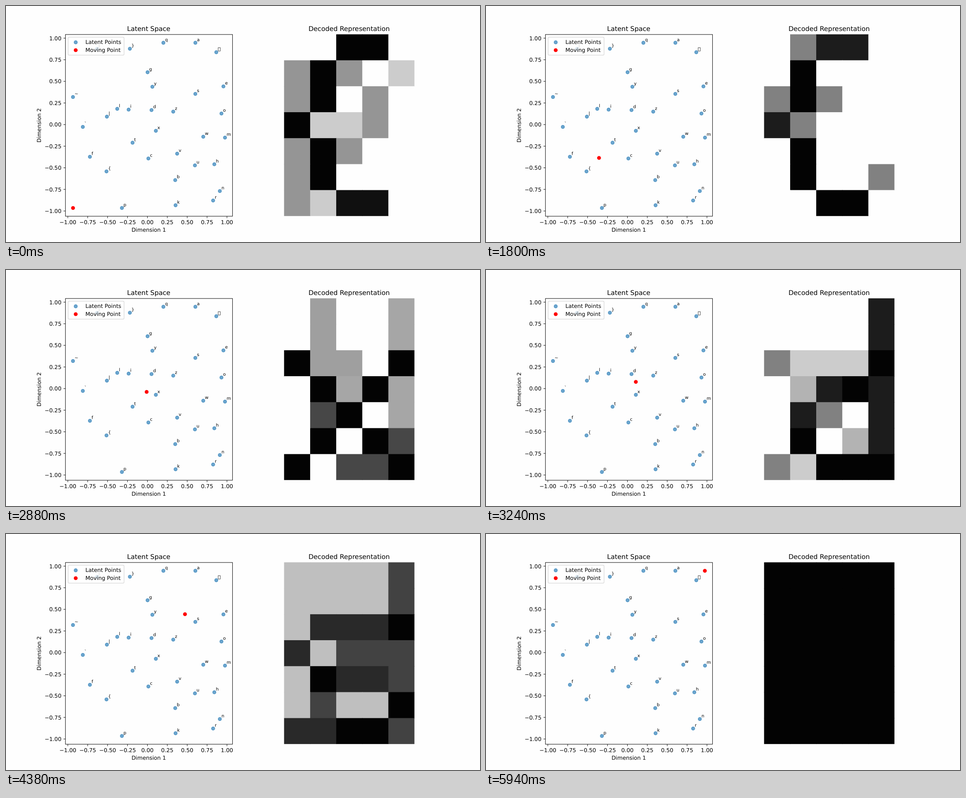
An HTML page that plays this animation: 1058x529 px, repeating every 6000 ms.

```html
<!DOCTYPE html>
<html lang="en">
<head>
<meta charset="utf-8">
<title>Latent Space</title>
<style>
  html, body { margin: 0; width: 100%; height: 100%; overflow: hidden; background: #fefefe; }
  svg { display: block; width: 1058px; height: 529px; }
  text { font-family: "DejaVu Sans", sans-serif; font-size: 12.25px; text-rendering: geometricPrecision; }
  .title { font-size: 14.7px; }
  .name { font-size: 9.8px; }
  .mid { text-anchor: middle; }
  .end { text-anchor: end; }
  .line { fill: none; stroke: #000; stroke-width: .98; }
  .dot { fill: #1f77b4; stroke: #1f77b4; stroke-width: 1.2; fill-opacity: .65; stroke-opacity: .65; }
  .red { fill: #f00; stroke: #f00; stroke-width: 1.2; }
  .box { fill: #fff; fill-opacity: .8; stroke: #ccc; stroke-opacity: .8; stroke-width: 1.2; }
</style>
</head>
<body>
<svg id="stage" viewBox="0 0 1058 529"></svg>
<script>
const stage = document.getElementById('stage');

function add(tag, attrs, content) {
  const el = document.createElementNS('http://www.w3.org/2000/svg', tag);
  for (const key in attrs) el.setAttribute(key, attrs[key]);
  if (content) el.textContent = content;
  stage.append(el);
  return el;
}
const text = (x, y, content, cls = '') => add('text', { x, y, class: cls }, content);
const dot = (cx, cy, cls = 'dot') => add('circle', { cx, cy, r: 3.68, class: cls });

// Scatter points
const points = {
  '~': [149.5, 204], '`': [171.5, 271], '|': [225.2, 248], l: [248.3, 230.5],
  i: [273.7, 232.3], '}': [276.5, 95.7], q: [351.3, 82.4], a: [422.7, 82.4],
  g: [316, 148.5], y: [326.7, 181], s: [422.6, 197], e: [485.3, 180.3],
  d: [324.8, 233.2], z: [373.3, 236.7], o: [480.9, 241], x: [334.5, 279.8],
  w: [440.3, 293], m: [488.8, 295], t: [282.5, 306.4], f: [187.3, 338],
  c: [317.8, 341.7], v: [382, 331], u: [421.7, 357.3], h: [465, 354.8],
  '{': [224.3, 370.7], b: [377.7, 390.2], n: [477.3, 414.7], k: [378.5, 446.6],
  r: [462.3, 436], p: [258.7, 452.8], j: [203, 96], '\x7f': [469.4, 103.6]
};
for (const name in points) dot(...points[name]);
const mover = dot(0, 0, 'red');
for (const name in points) {
  const [x, y] = points[name];
  if (name === '\x7f') {
    add('rect', { x: x + 4.3, y: y - 10.4, width: 4.5, height: 7.8, class: 'line', style: 'stroke-width:.7' });
  } else text(x + 3.6, y - 3.9, name, 'name');
}

// Axes
add('rect', { x: 132.7, y: 63.9, width: 372.9, height: 407.3, class: 'line' });
for (let i = -4; i <= 4; i++) {
  const label = (i < 0 ? '\u2212' : '') + Math.abs(i / 4).toFixed(2);
  const x = 315.6 + 44.4 * i, y = 265.8 - 48.43 * i;
  add('path', { d: `M${x} 471.2v4.3M132.7 ${y}h-4.3`, class: 'line' });
  text(x, 489.3, label, 'mid');
  text(123.7, y + 4.5, label, 'end');
}
text(318.6, 506.4, 'Dimension 1', 'mid');
add('text', { transform: 'translate(78 267.5) rotate(-90)', class: 'mid' }, 'Dimension 2');
text(318.6, 56.3, 'Latent Space', 'title mid');
text(765.9, 56.3, 'Decoded Representation', 'title mid');

// Legend
add('rect', { x: 138.7, y: 69.8, width: 124.8, height: 40.4, rx: 2.4, class: 'box' });
dot(155.6, 81.4);
dot(155.6, 99, 'red');
text(177.2, 85, 'Latent Points');
text(177.2, 102.9, 'Moving Point');

// Letters as pen strokes on a 5 by 7 grid; each corner is column then row
const COLS = 5, ROWS = 7;
const strokes = {
  '{': '30 20 11 12 03 14 15 26 36',
  p: '06 01 21 32 33 24 04',
  f: '16 11 20 30 41, 03 23',
  t: '10 15 26 36 45, 02 22',
  x: '02 46, 42 06',
  d: '40 46 26 15 14 23 43',
  z: '02 42 06 46',
  s: '42 12 03 14 34 45 36 06'
};

function trace(path) {
  const inked = new Set();
  for (const line of path.split(', ')) {
    const corners = line.split(' ').map(p => [...p].map(Number));
    corners.reduce(([x0, y0], [x1, y1]) => {
      const n = Math.max(Math.abs(x1 - x0), Math.abs(y1 - y0));
      for (let i = 0; i <= n; i++) {
        inked.add(`${x0 + (x1 - x0) * i / n},${y0 + (y1 - y0) * i / n}`);
      }
      return [x1, y1];
    });
  }
  return inked;
}
const glyphs = Object.entries(strokes).map(([name, path]) => ({ name, inked: trace(path) }));
glyphs.push({ name: 'full', inked: { has: () => true } });

// How strongly each letter shows as the point passes it
const mixes = [
  { step: 0, '{': .95, p: .42, f: .2 },
  { step: 17, '{': 1, p: .14, f: .08 },
  { step: 22, '{': 1 },
  { step: 30, '{': .9, t: .5 },
  { step: 39, t: 1 },
  { step: 48, x: 1, t: .38, d: .35 },
  { step: 54, x: .3, d: .9, z: .2 },
  { step: 60, z: .8, d: .66 },
  { step: 73, s: .6, d: .5, full: .25 },
  { step: 88, full: 1 }
];

const CELL = 58.19, LEFT = 620.69, TOP = 63.48;
const cells = [];
for (let r = 0; r < ROWS; r++) {
  for (let c = 0; c < COLS; c++) {
    // A slight overlap hides the seams
    const el = add('rect', {
      x: LEFT + CELL * c, y: TOP + CELL * r,
      width: CELL + (c < COLS - 1 ? .8 : 0), height: CELL + (r < ROWS - 1 ? .8 : 0)
    });
    cells.push({ el, letters: glyphs.filter(g => g.inked.has(`${c},${r}`)) });
  }
}

const STEP_MS = 60, STEPS = 100;

function draw(step) {
  const k = step / (STEPS - 1);
  mover.setAttribute('cx', 149.6 + 338.9 * k);
  mover.setAttribute('cy', 452.8 - 370.3 * k);

  const next = Math.max(1, mixes.findIndex(m => m.step > step));
  const i = step >= mixes.at(-1).step ? mixes.length - 1 : next;
  const from = mixes[i - 1], to = mixes[i];
  const part = Math.min(1, (step - from.step) / (to.step - from.step));
  const weight = name => (from[name] || 0) * (1 - part) + (to[name] || 0) * part;

  for (const { el, letters } of cells) {
    const dark = Math.min(1, letters.reduce((sum, g) => sum + weight(g.name), 0));
    const v = Math.round(254 - 251 * dark);
    el.setAttribute('fill', `rgb(${v},${v},${v})`);
  }
}

const start = performance.now();
function tick() {
  draw(Math.floor((performance.now() - start) / STEP_MS) % STEPS);
  requestAnimationFrame(tick);
}
tick();
</script>
</body>
</html>
```
